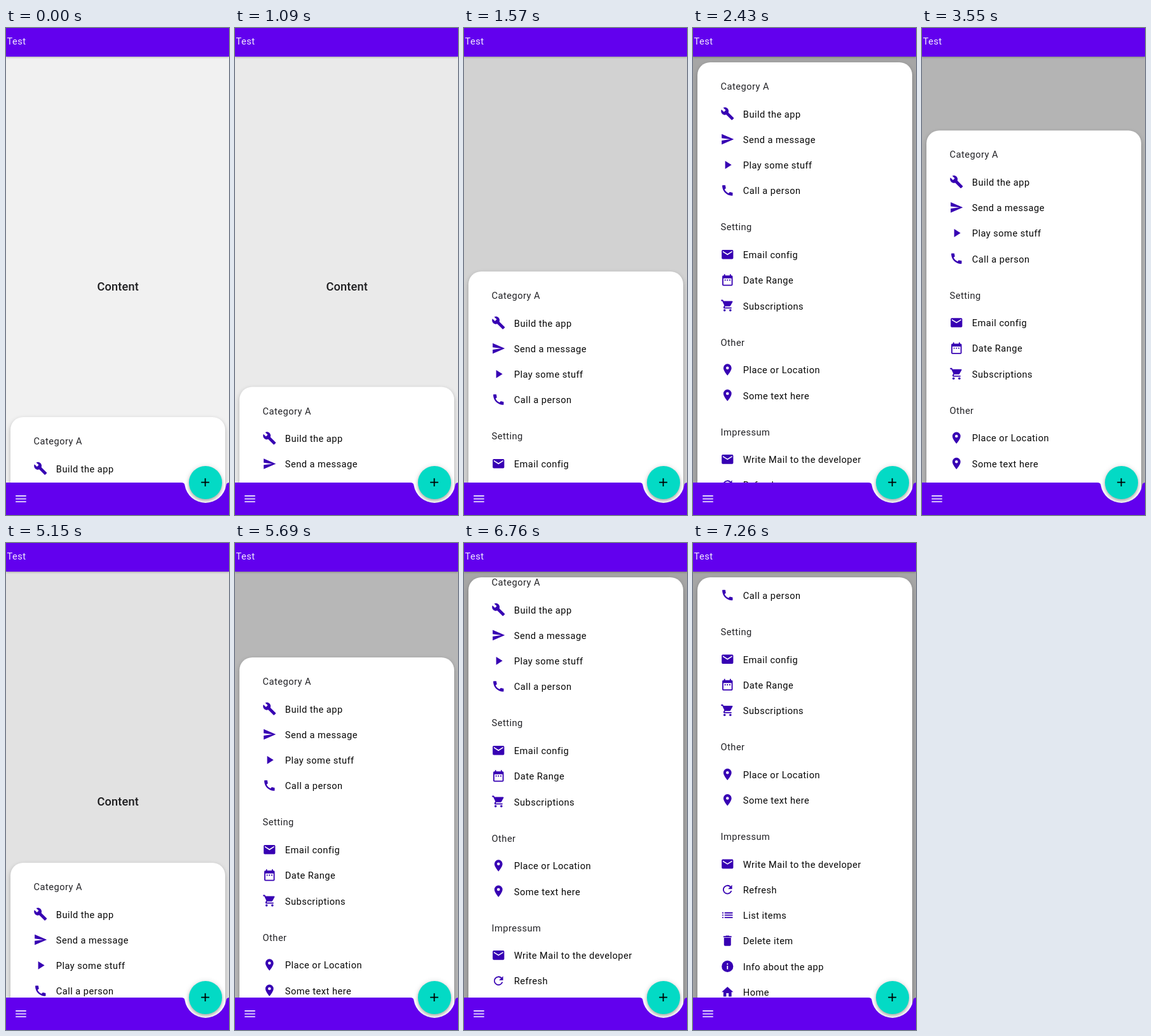
An HTML page that plays this animation: 351 px wide and 766 px high, repeating every 8000 ms.

```html
<!DOCTYPE html>
<html lang="en">
<head>
<meta charset="utf-8">
<title>Bottom sheet</title>
<style>
@property --y { syntax: "<number>"; inherits: true; initial-value: 612; }
@property --scroll { syntax: "<number>"; inherits: true; initial-value: 0; }

html, body { margin: 0; width: 100%; height: 100%; overflow: hidden; }
body { background: #f1f1f1; }

#stage {
  position: relative;
  width: 351px;
  height: 766px;
  overflow: hidden;
  background: #f1f1f1;
  font: 14.65px/1 Roboto, sans-serif;
  letter-spacing: .4575px;
  animation: drag 8s infinite, scroll 8s infinite;
  animation-timing-function: linear;
}
#stage > * { position: absolute; }
svg { display: block; overflow: visible; }

.content { left: 0; top: 0; font-size: 18.3px; font-weight: 500; letter-spacing: .137px; fill: #1e1e20; }
.scrim { inset: 0; background: #000; opacity: calc((612 - var(--y)) / 558 * .315); }
.sheet {
  left: 7px;
  top: 0;
  width: 338px;
  height: 720px;
  border-radius: 20px 20px 0 0;
  overflow: hidden;
  background: #fff;
  box-shadow: 0 3px 7px rgba(0, 0, 0, .26);
  transform: translateY(calc(var(--y) * 1px));
}
.list { margin-left: -7px; transform: translateY(calc(var(--scroll) * -1px)); }
.list text { fill: #080808; }
.list .head { fill: #222226; }
.list use { fill: #3700b3; }

.appbar { left: 0; top: 0; width: 351px; height: 44.5px; background: #6200ee; box-shadow: 0 1px 3px rgba(0, 0, 0, .3); }
.appbar text { fill: #f3ebfe; }
.bar { left: 0; top: 0; }
.fab {
  left: 288.4px;
  top: 689.4px;
  width: 51.2px;
  height: 51.2px;
  border-radius: 50%;
  background: #03dac5;
  box-shadow: 0 3px 5px rgba(0, 0, 0, .28), 0 0 8px rgba(0, 0, 0, .12);
}

/* Each segment jumps in discrete steps, as a low-rate screen capture does. */
@keyframes drag {
  0% { --y: 612; }
  12.375% { --y: 612; animation-timing-function: steps(4, start); }
  16.4375% { --y: 517; animation-timing-function: steps(4, start); }
  20.5% { --y: 383; animation-timing-function: steps(3, start); }
  23.125% { --y: 258; }
  23.5% { --y: 258; animation-timing-function: steps(3, start); }
  26.6875% { --y: 109; }
  28.25% { --y: 109; animation-timing-function: step-start; }
  29.3125% { --y: 85; animation-timing-function: step-start; }
  30.375% { --y: 64; animation-timing-function: step-start; }
  31.4% { --y: 54; }
  41.375% { --y: 54; animation-timing-function: steps(10, start); }
  51.375% { --y: 322; }
  51.625% { --y: 322; animation-timing-function: step-start; }
  52.5% { --y: 349; animation-timing-function: steps(2, start); }
  53.583% { --y: 530; animation-timing-function: steps(2, start); }
  54.667% { --y: 612; }
  61.375% { --y: 612; animation-timing-function: steps(5, start); }
  65.125% { --y: 503; }
  66.5% { --y: 503; animation-timing-function: steps(5, start); }
  72.25% { --y: 180; }
  72.375% { --y: 180; animation-timing-function: step-start; }
  73.125% { --y: 112; animation-timing-function: step-start; }
  73.875% { --y: 76; animation-timing-function: step-start; }
  74.625% { --y: 59; animation-timing-function: step-start; }
  75.2% { --y: 54; }
  100% { --y: 54; }
}
@keyframes scroll {
  0%, 84.5% { --scroll: 0; animation-timing-function: steps(4, start); }
  88.667% { --scroll: 120; animation-timing-function: steps(3, start); }
  91.75%, 100% { --scroll: 173.5; }
}
</style>
</head>
<body>
<div id="stage">
  <svg class="content" width="351" height="766"><text x="176.2" y="413.2" text-anchor="middle">Content</text></svg>
  <div class="scrim"></div>
  <div class="sheet"><svg class="list" width="351" height="1000"></svg></div>
  <div class="appbar"><svg width="351" height="44"><text x="1.6" y="25.6">Test</text></svg></div>
  <svg class="bar" width="351" height="766">
    <path fill="#6200ee" d="M0 715H276Q281 715 281.4 719A33 33 0 0 0 346.6 719Q347 715 352 715V766H0Z"/>
    <path stroke="#e6d8fc" stroke-width="1.8" d="M15.2 736h16.5m-16.5 4.6h16.5m-16.5 4.6h16.5"/>
  </svg>
  <div class="fab">
    <svg width="51.2" height="51.2"><path stroke="#000" stroke-width="1.8" d="M19.2 25.6h12.8m-6.4-6.4v12.8"/></svg>
  </div>
</div>

<svg width="0" height="0" style="position:absolute">
  <symbol id="build" viewBox="0 0 24 24"><path d="M22.7 19l-9.1-9.1c.9-2.3.4-5-1.5-6.9-2-2-5-2.4-7.4-1.3L9 6 6 9 1.6 4.7C.4 7.1.9 10.1 2.9 12.1c1.9 1.9 4.6 2.4 6.9 1.5l9.1 9.1c.4.4 1 .4 1.4 0l2.3-2.3c.5-.4.5-1.1.1-1.4z"/></symbol>
  <symbol id="send" viewBox="0 0 24 24"><path d="M2 21L23 12 2 3v7l15 2-15 2z"/></symbol>
  <symbol id="play" viewBox="0 0 24 24"><path d="M8 5v14l11-7z"/></symbol>
  <symbol id="call" viewBox="0 0 24 24"><path d="M20 15.4c-1.2 0-2.4-.2-3.5-.6-.4-.1-.8 0-1 .3l-1.6 1.9c-2.8-1.3-5.5-3.9-6.9-6.8l2-1.7c.2-.2.3-.6.2-1-.4-1.1-.6-2.3-.6-3.5 0-.6-.4-1-1-1H4.2C3.6 3 3 3.2 3 4c0 9.3 7.7 17 17 17 .7 0 1-.6 1-1.2v-3.4c0-.6-.4-1-1-1z"/></symbol>
  <symbol id="mail" viewBox="0 0 24 24"><path d="M20 4H4a2 2 0 0 0-2 2v12a2 2 0 0 0 2 2h16a2 2 0 0 0 2-2V6a2 2 0 0 0-2-2zm0 4l-8 5-8-5V6l8 5 8-5z"/></symbol>
  <symbol id="date" viewBox="0 0 24 24"><path d="M9 11H7v2h2zm4 0h-2v2h2zm4 0h-2v2h2zm2-7h-1V2h-2v2H8V2H6v2H5a2 2 0 0 0-2 2v14a2 2 0 0 0 2 2h14a2 2 0 0 0 2-2V6a2 2 0 0 0-2-2zm0 16H5V9h14z"/></symbol>
  <symbol id="cart" viewBox="0 0 24 24"><circle cx="7" cy="20" r="2"/><circle cx="17" cy="20" r="2"/><path d="M1 2v2h2l3.6 7.6-1.35 2.4A2 2 0 0 0 7 17h12v-2H7.4a.25.25 0 0 1-.2-.37L8.1 13h7.45a2 2 0 0 0 1.75-1L20.9 5.5A1 1 0 0 0 20 4H5.2L4.3 2z"/></symbol>
  <symbol id="place" viewBox="0 0 24 24"><path d="M12 2a7 7 0 0 0-7 7c0 5.25 7 13 7 13s7-7.75 7-13a7 7 0 0 0-7-7zm0 9.5a2.5 2.5 0 1 1 0-5 2.5 2.5 0 0 1 0 5z"/></symbol>
  <symbol id="refresh" viewBox="0 0 24 24"><path d="M17.65 6.35A8 8 0 1 0 19.73 14h-2.08A6 6 0 1 1 16.22 7.78L13 11h7V4z"/></symbol>
  <symbol id="list" viewBox="0 0 24 24"><path d="M3 7h2v2H3zm4 0h14v2H7zM3 11h2v2H3zm4 0h14v2H7zM3 15h2v2H3zm4 0h14v2H7z"/></symbol>
  <symbol id="delete" viewBox="0 0 24 24"><path d="M6 19a2 2 0 0 0 2 2h8a2 2 0 0 0 2-2V7H6zM19 4h-3.5l-1-1h-5l-1 1H5v2h14z"/></symbol>
  <symbol id="info" viewBox="0 0 24 24"><path d="M12 2a10 10 0 1 0 0 20 10 10 0 0 0 0-20zm1 15h-2v-6h2zm0-8h-2V7h2z"/></symbol>
  <symbol id="home" viewBox="0 0 24 24"><path d="M10 20v-6h4v6h5v-8h3L12 3 2 12h3v8z"/></symbol>
</svg>

<script>
const groups = [
  ["Category A", ["build", "Build the app"], ["send", "Send a message"], ["play", "Play some stuff"], ["call", "Call a person"]],
  ["Setting", ["mail", "Email config"], ["date", "Date Range"], ["cart", "Subscriptions"]],
  ["Other", ["place", "Place or Location"], ["place", "Some text here"]],
  ["Impressum", ["mail", "Write Mail to the developer"], ["refresh", "Refresh"], ["list", "List items"],
    ["delete", "Delete item"], ["info", "Info about the app"], ["home", "Home"]]
];
const icon = 21.9, pitch = 40.25, afterHead = 43.6, beforeHead = 57.1;
let y = 38, rows = "";
for (const [head, ...items] of groups) {
  rows += `<text class="head" x="43.6" y="${y + 5}">${head}</text>`;
  y += afterHead;
  for (const [id, label] of items) {
    rows += `<use href="#${id}" x="43.3" y="${y - .8 - icon / 2}" width="${icon}" height="${icon}"/>`;
    rows += `<text x="78.8" y="${y + 5}">${label}</text>`;
    y += pitch;
  }
  y += beforeHead - pitch;
}
document.querySelector(".list").innerHTML = rows;
</script>
</body>
</html>
```
